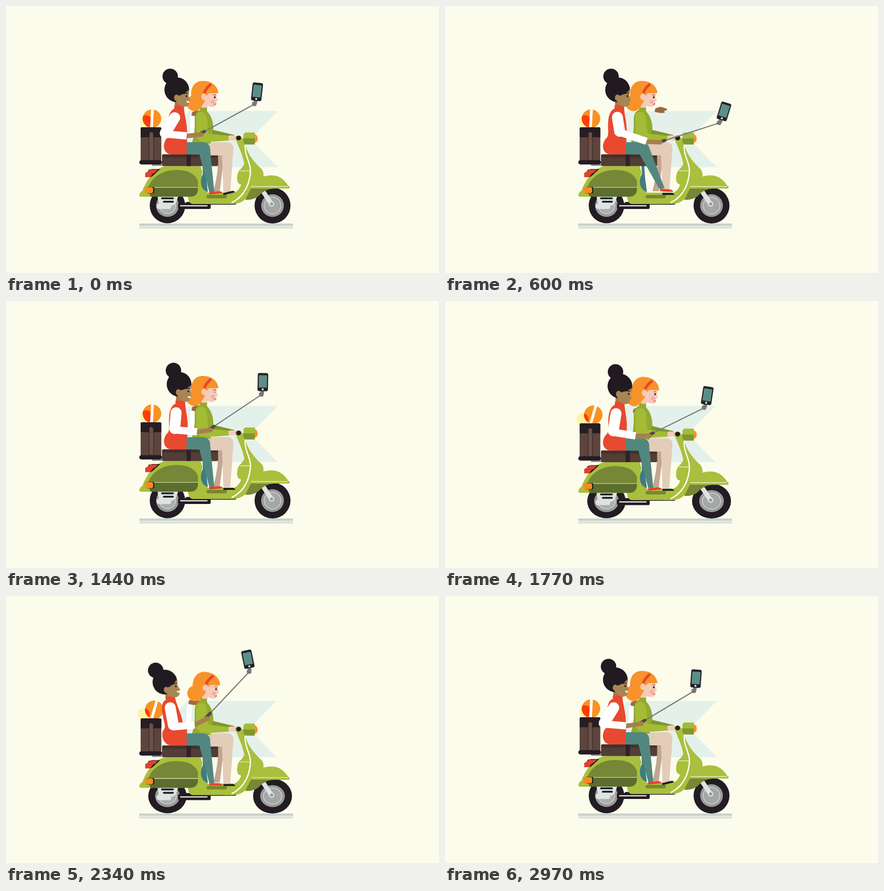
These frames come from a looping animation (952 by 588 pixels, 3000 ms). An HTML page without scripts:

```html
<!DOCTYPE html>
<html lang="en">
<head>
<meta charset="utf-8">
<title>Scooter selfie</title>
<style>
@property --b { syntax: "<number>"; inherits: true; initial-value: 0 }
@property --lean { syntax: "<angle>"; inherits: true; initial-value: 0deg }
@property --hx { syntax: "<length>"; inherits: true; initial-value: 0px }
@property --hy { syntax: "<length>"; inherits: true; initial-value: 0px }
@property --hr { syntax: "<angle>"; inherits: true; initial-value: 0deg }
@property --kx { syntax: "<length>"; inherits: true; initial-value: 424px }
@property --ky { syntax: "<length>"; inherits: true; initial-value: 283px }
@property --kr { syntax: "<angle>"; inherits: true; initial-value: -29deg }
html, body { margin: 0; width: 100%; height: 100%; overflow: hidden; background: #fcfcec }
svg { display: block; width: 952px; height: 588px; animation: bounce 3s infinite ease-in-out, pose 3s infinite }

@keyframes bounce {
  0%, 20%, 48%, 68%, 90%, 100% { --b: 0 }
  10%, 36%, 59%, 77% { --b: 1 }
}
/* head offset and turn, torso lean, selfie stick */
@keyframes pose {
  0% { --hx: 0px; --hy: 0px; --hr: 0deg; --lean: 0deg; --kx: 422px; --ky: 284px; --kr: -28.7deg; animation-timing-function: ease-out }
  20% { --hx: 4px; --hy: 0px; --hr: 0deg; --lean: -1.5deg; --kx: 468px; --ky: 301px; --kr: -17.8deg; animation-timing-function: ease-in }
  36% { --hx: 9px; --hy: 3px; --hr: 10deg; --lean: -2deg; --kx: 456px; --ky: 291px; --kr: -29.3deg; animation-timing-function: ease-out }
  48% { --hx: 5px; --hy: -1px; --hr: 4deg; --lean: -1.5deg; --kx: 444px; --ky: 285px; --kr: -33.8deg; animation-timing-function: ease-in-out }
  59% { --hx: 9px; --hy: 3px; --hr: 9deg; --lean: -2deg; --kx: 443px; --ky: 298px; --kr: -26.3deg; animation-timing-function: ease-in }
  78% { --hx: -26px; --hy: 5px; --hr: -12deg; --lean: 10.5deg; --kx: 438px; --ky: 270px; --kr: -46.7deg; animation-timing-function: ease-out }
  88% { --hx: -26px; --hy: 5px; --hr: -12deg; --lean: 10.5deg; --kx: 425px; --ky: 255px; --kr: -55.5deg; animation-timing-function: ease-in }
  99% { --hx: -1px; --hy: 0px; --hr: -1deg; --lean: .5deg; --kx: 426px; --ky: 282px; --kr: -31deg; animation-timing-function: linear }
  100% { --hx: 0px; --hy: 0px; --hr: 0deg; --lean: 0deg; --kx: 422px; --ky: 284px; --kr: -28.7deg }
}
.ride { transform: translateY(calc(var(--b) * 2.5px)) }
.beam { transform: translateX(calc(var(--b) * -3px)) }
.wheel { transform: scale(calc(1 + var(--b) * .085), calc(1 - var(--b) * .03)) }
.rear { transform-origin: 355px 478px }
.front { transform-origin: 586px 478px }
.ball { transform: translateX(calc(var(--b) * 5px)) }
.stripe { transform: rotate(calc(3deg + var(--b) * 13deg)); transform-origin: 321px 248px }
.sun { transform: translate(calc(var(--b) * -6px), calc(var(--b) * 4px)) }
.sun2 { transform: translate(calc(var(--b) * -11px), calc(var(--b) * 4px)) }
.nod { transform: rotate(calc(var(--b) * 5deg)); transform-origin: 440px 235px }
.vest { transform: skewX(var(--lean)); transform-origin: 380px 326px }
.head { transform: translate(var(--hx), var(--hy)) rotate(var(--hr)); transform-origin: 376px 185px }
.stick { transform: translate(var(--kx), var(--ky)) rotate(var(--kr)) }

.up, .sl, .ha { fill: none; stroke-linejoin: round }
.up { stroke: #fff; stroke-width: 24; stroke-linecap: round; animation: up 3s infinite }
.sl { stroke: #fff; stroke-width: 16; animation: sl 3s infinite }
.ha { stroke: #a87f4e; stroke-width: 10; stroke-linecap: round; animation: ha 3s infinite }
@keyframes up {
  0%, 100% { d: path("M371 246L350 280"); animation-timing-function: ease-out }
  20% { d: path("M379 245L384 276"); animation-timing-function: ease-in }
  36% { d: path("M376 248L374 284"); animation-timing-function: ease-out }
  48% { d: path("M374 246L371 281"); animation-timing-function: ease-in-out }
  59% { d: path("M376 248L370 286"); animation-timing-function: ease-in }
  78% { d: path("M361 246L368 284"); animation-timing-function: ease-out }
  88% { d: path("M359 246L367 282"); animation-timing-function: ease-in }
  99% { d: path("M371 246L350 280"); animation-timing-function: linear }
}
@keyframes sl {
  0%, 100% { d: path("M351 282L397 286"); animation-timing-function: ease-out }
  20% { d: path("M384 278L443 298"); animation-timing-function: ease-in }
  36% { d: path("M374 287L432 294"); animation-timing-function: ease-out }
  48% { d: path("M371 284L420 288"); animation-timing-function: ease-in-out }
  59% { d: path("M370 289L419 297"); animation-timing-function: ease-in }
  78% { d: path("M368 288L415 284"); animation-timing-function: ease-out }
  88% { d: path("M367 286L411 275"); animation-timing-function: ease-in }
  99% { d: path("M351 282L398 286"); animation-timing-function: linear }
}
@keyframes ha {
  0%, 100% { d: path("M400 286L429 283"); animation-timing-function: ease-out }
  20% { d: path("M444 299L473 300"); animation-timing-function: ease-in }
  36% { d: path("M434 294L460 291"); animation-timing-function: ease-out }
  48% { d: path("M422 288L450 284"); animation-timing-function: ease-in-out }
  59% { d: path("M421 297L449 297"); animation-timing-function: ease-in }
  78% { d: path("M417 283L442 270"); animation-timing-function: ease-out }
  88% { d: path("M413 274L430 253"); animation-timing-function: ease-in }
  99% { d: path("M400 286L432 281"); animation-timing-function: linear }
}
.wave { animation: wave 3s infinite ease-in-out }
@keyframes wave {
  0%, 48%, 99%, 100% { transform: none }
  20% { transform: translate(53px, -8px) }
  36% { transform: translate(16px, -5px) }
  59% { transform: translate(5px, 2px) }
  78%, 88% { transform: translate(-7px, -6px) }
}
.cuff { animation: cuff 3s infinite }
@keyframes cuff {
  0%, 48%, 72%, 100% { opacity: 1 }
  8%, 40%, 56%, 62% { opacity: 0 }
}
.shin { transform-origin: 436px 312px; animation: shin 3s infinite ease-in-out }
@keyframes shin {
  0%, 36%, 100% { transform: none }
  20% { transform: rotate(-15deg) }
}
.toe { transform-origin: 449px 413px; animation: toe 3s infinite ease-in-out }
@keyframes toe {
  0%, 48%, 59%, 100% { transform: rotate(-6deg) }
  20% { transform: rotate(18deg) }
  36%, 78% { transform: none }
}
.toe2 { transform-origin: 480px 415px; animation: toe2 3s infinite ease-in-out }
@keyframes toe2 {
  0%, 99%, 100% { transform: rotate(-14deg) }
  16%, 84% { transform: none }
}
.blink { transform-origin: 459px 201px; animation: blink 3s infinite }
@keyframes blink {
  0%, 45%, 51%, 100% { transform: none }
  46.5%, 49.5% { transform: scaleY(.2) }
}
.smile { animation: smile 3s infinite step-end }
@keyframes smile {
  0%, 30%, 70% { opacity: 1 }
  12%, 54% { opacity: 0 }
}
</style>
</head>
<body>
<svg viewBox="0 0 952 588">
  <defs>
    <clipPath id="disc"><circle cx="321" cy="248" r="20.5"/></clipPath>
  </defs>
  <path fill="#c9d1cc" d="M293 479h338v5.2H293z"/>
  <path fill="#dde2da" d="M293 485.2h338v5H293z"/>
  <circle cx="598" cy="293" r="62" fill="#fdfce8"/>
  <path class="beam" fill="#e4f1ea" d="M402 231H598L537 293L598 355H400L385 300V250Z"/>

  <!-- wheels -->
  <g class="wheel rear">
    <circle cx="355" cy="439.500" r="39" fill="#231c23"/>
    <circle cx="355" cy="439.500" r="25" fill="#9a9b9b"/>
    <circle cx="355" cy="439.500" r="18" fill="#adaeae" stroke="#d5d8d6" stroke-width="1.500"/>
  </g>
  <g class="wheel front">
    <circle cx="586" cy="439.500" r="39.500" fill="#231c23"/>
    <circle cx="586" cy="439.500" r="25" fill="#9a9b9b"/>
    <circle cx="586" cy="439.500" r="18.500" fill="#a5a6a6" stroke="#d5d8d6" stroke-width="1.500"/>
  </g>

  <g class="ride">
    <!-- exhaust and engine cover -->
    <path fill="none" stroke="#231c23" stroke-width="6" d="M398 434.500H503" stroke-linecap="round"/>
    <rect x="378" y="434" width="72" height="13" rx="3" fill="#231c23"/>
    <path stroke="#f3f3ea" stroke-width="2.500" d="M383 440H443"/>
    <path fill="#dde3e0" d="M333 418H379L374 433Q371 439 363 440V443Q363 447 359 447H336Q331 447 331 441T336 435Q334 428 333 418Z"/>
    <path stroke="#231c23" stroke-width="4" stroke-linecap="round" d="M343 423.500H367M347 431H367"/>
    <path stroke="#dde3e0" stroke-width="10" stroke-linecap="round" d="M567 411L583 435"/>
    <circle cx="584" cy="436" r="6" fill="#dde3e0"/>
    <circle cx="584" cy="436" r="3.500" fill="#9a9b9b"/>

    <!-- far leg -->
    <path fill="#c3a592" d="M467 326H480L470 408H456Q467 370 467 326Z"/>

    <!-- body -->
    <path fill="#a9bf3d" d="M293 416Q295 409 300 407C308 385 325 358 350 352.500H428L432 367C427 380 430 398 443 411H502V436H410Q401 434 400 420H298Q293 420 293 416Z"/>
    <path fill="#3f7c80" d="M432 352H438L440 380L444 410Q428 404 428.500 386Q429 376 433 370Z"/>
    <path fill="#768837" d="M312 400C322 375 345 361 375 361Q412 361 422 385V400Z"/>
    <path fill="#5c6e2d" d="M310 400H422Q423 419 406 420H318Z"/>
    <path stroke="#eef2cf" stroke-width="1.200" d="M326 399.500H422"/>
    <rect x="441" y="416" width="62" height="7.500" rx="3.500" fill="#75882f"/>
    <path fill="#231c23" d="M313 361L321 359H339L324 373H312Z"/>
    <path fill="#df432f" d="M306 377V368L318 360H334L318 377Z"/>
    <path fill="#231c23" d="M317 377L310 368H327L322 375Z"/>
    <path fill="#df432f" d="M306 377V368H324L317 377Z"/>
    <rect x="308" y="398.500" width="18" height="14" rx="3" fill="#231c23"/>
    <rect x="305" y="399" width="18.500" height="13" rx="4" fill="#f78a22"/>

    <!-- front shield -->
    <path fill="#a9bf3d" d="M504 291H524C525 318 543 342 561 358Q567 364 566 375L545 400C533 420 523 435 500 436H480L488 411H502Q513 406 517 393Q508 392 508 380Q508 364 518 357L524 348C520 326 512 312 504 291Z"/>
    <path fill="#768837" d="M526 427L541 397H623V402H588Q568 404 557 417Q548 427 526 427Z"/>
    <path fill="#a9bf3d" d="M539 398C548 382 562 373 584 373C602 373 614 384 623 400V402H537Z"/>
    <path stroke="#eef2cf" stroke-width="1.300" d="M539 397.500H620M514 363H536" fill="none"/>
    <path fill="none" stroke="#fbfbea" stroke-width="3" d="M526 306C524 332 540 345 537 370C533 405 515 424 496 433"/>

    <!-- rear suitcase -->
    <circle class="sun" cx="308" cy="254" r="13" fill="#fdf5a3"/>
    <g class="ball">
      <g clip-path="url(#disc)">
        <circle cx="321" cy="248" r="20.500" fill="#f8931f"/>
        <circle class="sun2" cx="308" cy="254" r="13.500" fill="#fd3d0c"/>
        <path class="stripe" fill="#fff" d="M318 225h6v46h-6z"/>
      </g>
    </g>
    <path fill="#8d8d88" d="M321 348h22v4h-22z"/>
    <rect x="296" y="267" width="45.500" height="75" rx="3" fill="#5d453e"/>
    <path fill="#261e22" d="M299 267H338.500Q341.500 267 341.500 270V289H296V270Q296 267 299 267Z"/>
    <path fill="#493530" d="M313 289h13v51h-13z"/>
    <path fill="#6a5048" d="M315.500 280Q319.500 275 323.500 280V339h-8z"/>
    <rect x="293" y="339.500" width="50" height="9.500" rx="4.700" fill="#231c23"/>

    <!-- seat bag -->
    <rect x="343" y="326.500" width="123.500" height="26" rx="3" fill="#523d37"/>
    <path fill="#44322e" d="M344 327h122v7h-122z"/>
    <path fill="#2e2326" d="M397 327h9.500v25.500h-9.500z"/>

    <!-- driver -->
    <g class="wave">
      <path class="cuff" stroke="#fff" stroke-width="11" d="M411 242L408 290"/>
      <path fill="#9a6a3f" d="M409 234Q414 231 422 230L434 234Q437 237 433 238L429 239L430 243Q420 245 408 241Z"/>
    </g>
    <path fill="#7d962d" d="M452 272L502 284V291L450 288Z"/>
    <path fill="#e3cdb9" d="M436 302Q470 299 489 300Q500 302 500 314L493 410H478L475 329H440Z"/>
    <path class="toe2" fill="#231c23" d="M478 416V411.500H498Q504 412 504 416Z"/>
    <path fill="#93aa2f" d="M427 222H442V232Q456 246 456 272L450 290V303H408Q416 282 415 252Q414 234 427 228Z"/>
    <path fill="#a4bb36" d="M418 242Q421 233 430 233Q440 234 442 250L445 281L491 286V296L440 300Q421 300 419 284Z"/>
    <rect x="489" y="285" width="17" height="11" rx="4" fill="#f5cbb9"/>
    <g class="nod">
      <path fill="#f5cbb9" d="M430 210H443V224H430Z"/>
      <path fill="#f8922a" d="M407 198C406 176 417 165 433 165C452 165 466 176 467 192H450L440 200Q437 213 431 219A17.500 17.500 0 1 1 407 198Z"/>
      <path fill="#f5cbb9" d="M440 192H463L463 201L466.500 208L462.500 210V217Q460 223 452 222Q441 222 437 212Z"/>
      <path fill="#f8922a" d="M438 176L467 192H453L450 183Q449 192 440 198Z"/>
      <path stroke="#e6472f" stroke-width="6" d="M451 172Q440 180 436 192" fill="none"/>
      <ellipse cx="435" cy="200" rx="5.500" ry="7" fill="#f5cbb9"/>
      <circle cx="455" cy="211" r="4.500" fill="#f3ada4"/>
      <ellipse class="blink" cx="459" cy="201" rx="1.800" ry="2.200" fill="#231c23"/>
      <path d="M455 196.500Q458 194.500 462 196.500M457 216.500Q460 217 462 215" fill="none" stroke="#b5532c" stroke-width="1.300"/>
    </g>

    <!-- headset -->
    <rect x="504" y="286.500" width="14" height="8" rx="3" fill="#a9bf3d"/>
    <circle cx="511.500" cy="290.500" r="5.300" fill="#231c23"/>
    <path fill="#f8922a" d="M545 281Q553.500 284 553.500 292T545 302Z"/>
    <path fill="#a4bb3a" d="M527 278.500H547V292H522V284Q523 279 527 278.500Z"/>
    <path fill="#7f9730" d="M522 291.500H547V305H529Q522 304 522 297Z"/>

    <!-- passenger -->
    <g class="vest">
      <path fill="#a07b4a" d="M371 203H386V224H371Z"/>
      <path fill="#e8492f" d="M370 219H391C391 238 398 254 398 275V326H364C345 326 344 302 353 292C362 285 354 268 358 244Q361 230 370 226Z"/>
    </g>
    <path fill="#e8492f" d="M398 285V327H366C344 327 343 302 355 292Z"/>
    <g class="shin">
      <path fill="#52877f" d="M424 322L448 309L458 410H447Z"/>
      <path class="toe" fill="#e4432f" d="M447 415V409.500H466Q476 410 476 415Z"/>
    </g>
    <path fill="#52877f" d="M397 300H434Q448 301 449 316L446 330L424 327H397Z"/>
  </g>

  <g class="head">
    <circle cx="361" cy="155" r="17" fill="#211a20"/>
    <circle cx="375.500" cy="184.500" r="27.200" fill="#211a20"/>
    <path fill="#a88554" d="M402 184L401.500 199L405 208L402 211V216Q399 222 392 222Q379 221 374 210L378 198Q394 194 402 184Z"/>
    <ellipse cx="375" cy="202" rx="5.500" ry="7" fill="#a88554"/>
    <circle cx="375" cy="212" r="1.500" fill="#e8492f"/>
    <path d="M391 193.500Q395 191 400 192.500" fill="none" stroke="#211a20" stroke-width="1.800"/>
    <ellipse cx="397" cy="198.500" rx="1.700" ry="2.200" fill="#211a20"/>
    <path class="smile" fill="#fff" d="M396 209.500H403.500Q402 214 398.500 213Z"/>
  </g>

  <g class="stick">
    <path stroke="#7b7a7d" stroke-width="2.500" d="M0 0H141"/>
    <path stroke="#4f4b4f" stroke-width="7" stroke-linecap="round" d="M2 0H16"/>
    <g transform="translate(141 0) rotate(35)">
      <rect x="-5" y="-5" width="10" height="9" rx="3.500" fill="#77767a"/>
      <path fill="#77767a" d="M-2-10h8v8h-8z"/>
      <rect x="-8.500" y="-48" width="23" height="40" rx="4" fill="#262126"/>
      <rect x="-6" y="-43" width="18" height="27" fill="#5a8f87"/>
      <circle cx="3" cy="-12" r="2.300" fill="#d8dcd8"/>
    </g>
  </g>
  <path class="ha" d="M400 286L429 283"/>
  <path class="sl" d="M351 282L397 286"/>
  <path class="up" d="M371 246L350 280"/>
</svg>
</body>
</html>
```
